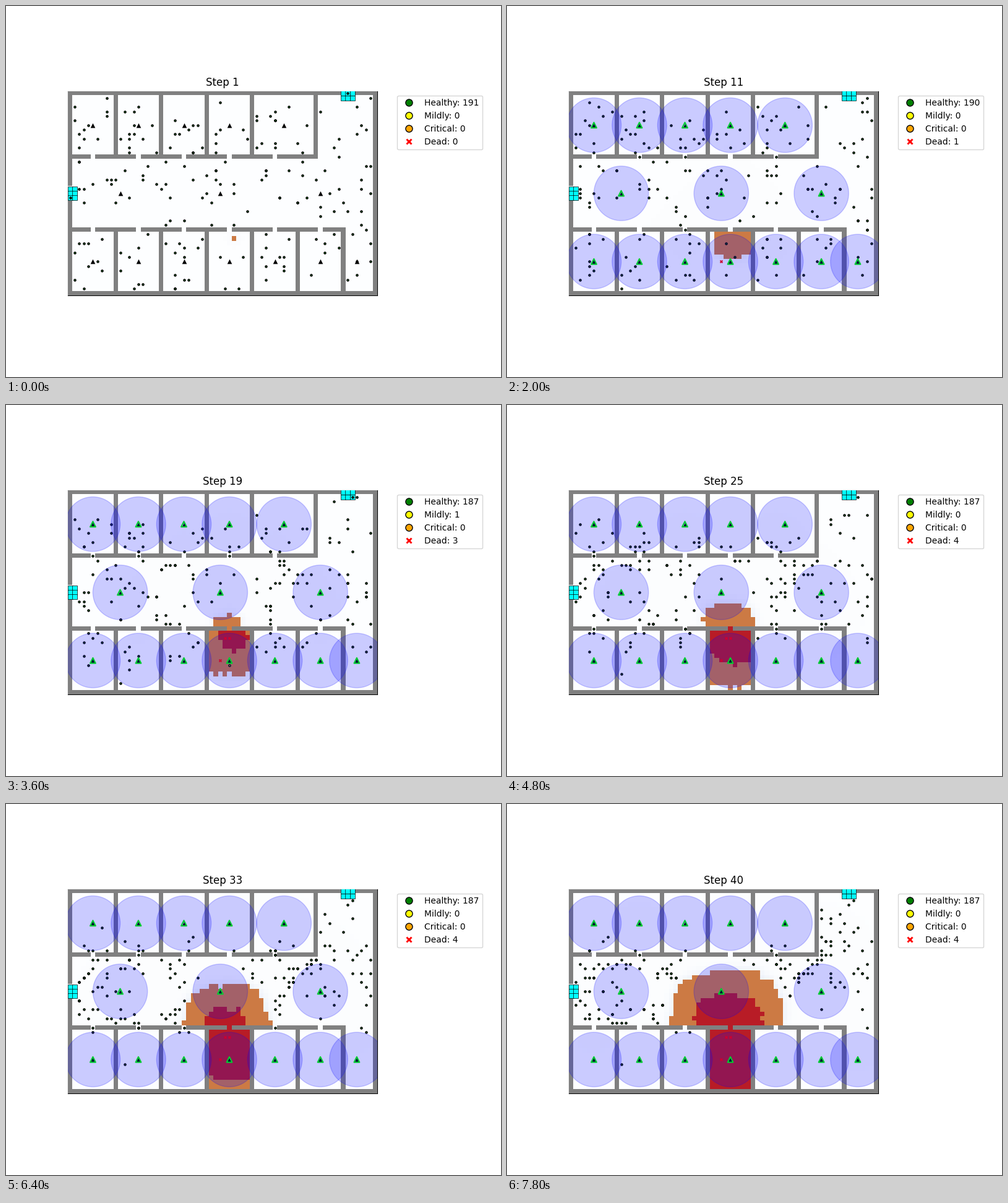
Recreate the animation shown at these times as a matplotlib script. Size 800x600 px, loop 8 s.

```python
import numpy as np
import matplotlib.pyplot as plt
from matplotlib.animation import FuncAnimation
from matplotlib.lines import Line2D
from matplotlib.patches import Circle

COLS, ROWS, STEPS = 68, 45, 40
CROWD = 191
ALARM = 10       # step at which the detectors go off
BURN = 11        # steps from ignition until a cell is burnt out
PACE = 2.25      # steps the fire needs to cross one cell
FLOOR, SMOKE, GREY, FLAME, BURNT = np.array([
    (253, 254, 255), (232, 238, 248), (128, 128, 128),
    (204, 122, 68), (184, 28, 38)]) / 255
rng = np.random.default_rng(12)

# ---------- floor plan ----------
wall = np.zeros((ROWS, COLS), bool)
wall[[0, -1]] = True
wall[:, [0, -1]] = True
wall[14, :55] = True
wall[30, :61] = True
wall[:15, [10, 20, 30, 40, 54]] = True
wall[30:, 10:61:10] = True
wall[14, 5:46:10] = False
wall[30, 5:56:10] = False

exits = [(r, c) for r in range(21, 24) for c in range(2)]
exits += [(r, c) for r in range(2) for c in range(60, 63)]
for cell in exits:
    wall[cell] = False

detectors = [(7, c) for c in (5, 15, 25, 35, 47)]
detectors += [(22, c) for c in (11, 33, 55)]
detectors += [(37, c) for c in (5, 15, 25, 35, 45, 55, 63)]

row, col = np.mgrid[:ROWS, :COLS]
fire_room = (row > 30) & (row < 44) & (col > 30) & (col < 40)
hall = (row > 14) & (row < 30) & ~wall


# ---------- fire ----------
def front(start, r0, c0):
    """Step at which a rounded-square front from (r0, c0) gets to each cell."""
    reach = (np.abs(row - r0) ** 3 + np.abs(col - c0) ** 3) ** (1 / 3)
    ragged = rng.uniform(-1.1, 1.1, reach.shape) * (reach > 0)
    return start + PACE * reach + ragged


# the room burns from one cell, then the hall from the room's door
ignite = np.where(fire_room, front(1, 32, 36), np.inf)
ignite = np.where(hall, front(12.3, 30, 34.5), ignite)
ignite[30, 35] = 12.5


def paint_floor():
    """Colour grids of the building, one for each step."""
    grids, smoke = [], np.zeros((ROWS, COLS))
    for step in range(1, STEPS + 1):
        smoke = np.maximum(smoke, ignite <= step)
        for _ in range(2):
            spread = sum(np.roll(smoke, k, a) for k in (1, -1) for a in (0, 1))
            smoke = np.where(wall, 0, (smoke + spread) / 5)
        grid = FLOOR + smoke[..., None] * (SMOKE - FLOOR)
        grid[wall] = GREY
        grid[ignite <= step] = FLAME
        grid[ignite <= step - BURN] = BURNT
        grids.append(grid)
    return grids


# ---------- people ----------
MOVES = [(r, c) for r in (-1, 0, 1) for c in (-1, 0, 1)]

# steps of injury and death, first and last cell (row, col)
VICTIMS = [(6, 11, (36, 38), (37, 33)), (12, 16, (36, 33), (32, 34)),
           (15, 17, (43, 37), (32, 35)), (18, 22, (43, 34), (37, 35))]


def exit_field(free):
    """Number of moves from every cell to the nearest exit."""
    field = np.full((ROWS + 2, COLS + 2), 999.0)
    inner = field[1:-1, 1:-1]
    for cell in exits:
        inner[cell] = 0
    for _ in range(95):
        best = np.min([field[1 + r:1 + r + ROWS, 1 + c:1 + c + COLS]
                       for r, c in MOVES], axis=0) + 1
        inner[free] = np.minimum(inner, best)[free]
    return inner


def move(cell, free, field, urge, roam):
    """Next cell: towards an exit by chance urge, else anywhere by roam."""
    r, c = cell
    near = [(r + a, c + b) for a, b in MOVES
            if 0 <= r + a < ROWS and 0 <= c + b < COLS and free[r + a, c + b]]
    if not near:
        return cell
    if rng.random() < urge:
        low = min(field[p] for p in near)
        near = [p for p in near if field[p] == low]
    elif rng.random() > roam:
        return cell
    return near[rng.integers(len(near))]


def walk():
    """Cells of the unhurt walkers at each step."""
    spots = np.argwhere(~wall & ~fire_room)
    people = [tuple(p) for p in rng.choice(spots, CROWD - len(VICTIMS))]
    pace = [rng.uniform(0.18, 0.55) + 0.15 * (r > 30) for r, _ in people]
    track = [people]
    for step in range(2, STEPS + 1):
        alarm = step >= ALARM
        free = ~wall & (ignite > step + 2)
        field = exit_field(free)
        left = []
        for cell, urge in zip(people, pace):
            danger = ignite[cell] <= step + 3
            chance = 1 if danger else urge * alarm
            for _ in range(1 + danger):
                cell = move(cell, free, field, chance, 0.25 if alarm else 0.7)
            out = alarm and cell in exits and rng.random() < 0.6
            if not out and ignite[cell] > step:
                left.append((cell, urge))
        people, pace = zip(*left)
        track.append(list(people))
    return track


def victim_state(step):
    """Cells of the victims grouped into healthy, mildly hurt and dead."""
    groups = [], [], []
    for hurt, death, start, end in VICTIMS:
        k = min(1, (step - 1) / (death - 1))
        cell = tuple(round(a + (b - a) * k) for a, b in zip(start, end))
        groups[(step >= hurt) + (step >= death)].append(cell)
    return groups


def centres(cells):
    """Middle points (x, y) of cells (row, col)."""
    return np.array(cells, float).reshape(-1, 2)[:, ::-1] + 0.5


grids = paint_floor()
tracks = walk()

# ---------- drawing ----------
fig, ax = plt.subplots(figsize=(8, 6), dpi=100)
fig.subplots_adjust(right=0.75)
ax.set(xlim=(0, COLS), ylim=(ROWS, 0), xticks=[], yticks=[])
ax.set_aspect("equal")
floor = ax.imshow(grids[0], extent=(0, COLS, ROWS, 0),
                  interpolation="nearest", zorder=3)


def marks(cells, z, **style):
    x, y = centres(cells).T
    return ax.scatter(x, y, zorder=z, **style)


marks(exits, 4, marker="s", s=30, color="cyan", ec="black", linewidths=0.5)
dot = dict(s=5, linewidths=1, edgecolors="black")
healthy = marks([], 5, facecolors="green", **dot)
mild = marks([], 6, facecolors="yellow", **dot)
dead = marks([], 6, marker="X", s=14, color="red", linewidths=0)
marks(detectors, 7, marker="^", s=30, color="black", linewidths=0)
lit = [marks(detectors, 8, marker="^", s=40, facecolors="none",
             edgecolors="lime", linewidths=1.5)]
for spot in centres(detectors):
    lit.append(ax.add_patch(Circle(spot, 6, color="blue", alpha=0.2, zorder=9)))

title = ax.set_title("Step 1")
names = ["Healthy", "Mildly", "Critical", "Dead"]
fills = ["green", "yellow", "orange", "red"]
keys = [Line2D([0], [0], marker="X" if name == "Dead" else "o", color="w",
               markerfacecolor=fill, markersize=8,
               markeredgecolor="w" if name == "Dead" else "black")
        for name, fill in zip(names, fills)]
legend = ax.legend(keys, names, loc="upper left", bbox_to_anchor=(1.05, 1))


def draw(i):
    step = i + 1
    well, hurt, lost = victim_state(step)
    floor.set_data(grids[i])
    healthy.set_offsets(centres(tracks[i] + well))
    mild.set_offsets(centres(hurt))
    dead.set_offsets(centres(lost))
    for item in lit:
        item.set_visible(step >= ALARM)
    title.set_text(f"Step {step}")
    counts = CROWD - len(hurt) - len(lost), len(hurt), 0, len(lost)
    for text, name, n in zip(legend.get_texts(), names, counts):
        text.set_text(f"{name}: {n}")
    return []


anim = FuncAnimation(fig, draw, frames=STEPS, interval=200,
                     repeat=True, repeat_delay=0, blit=False)
plt.show()
```
